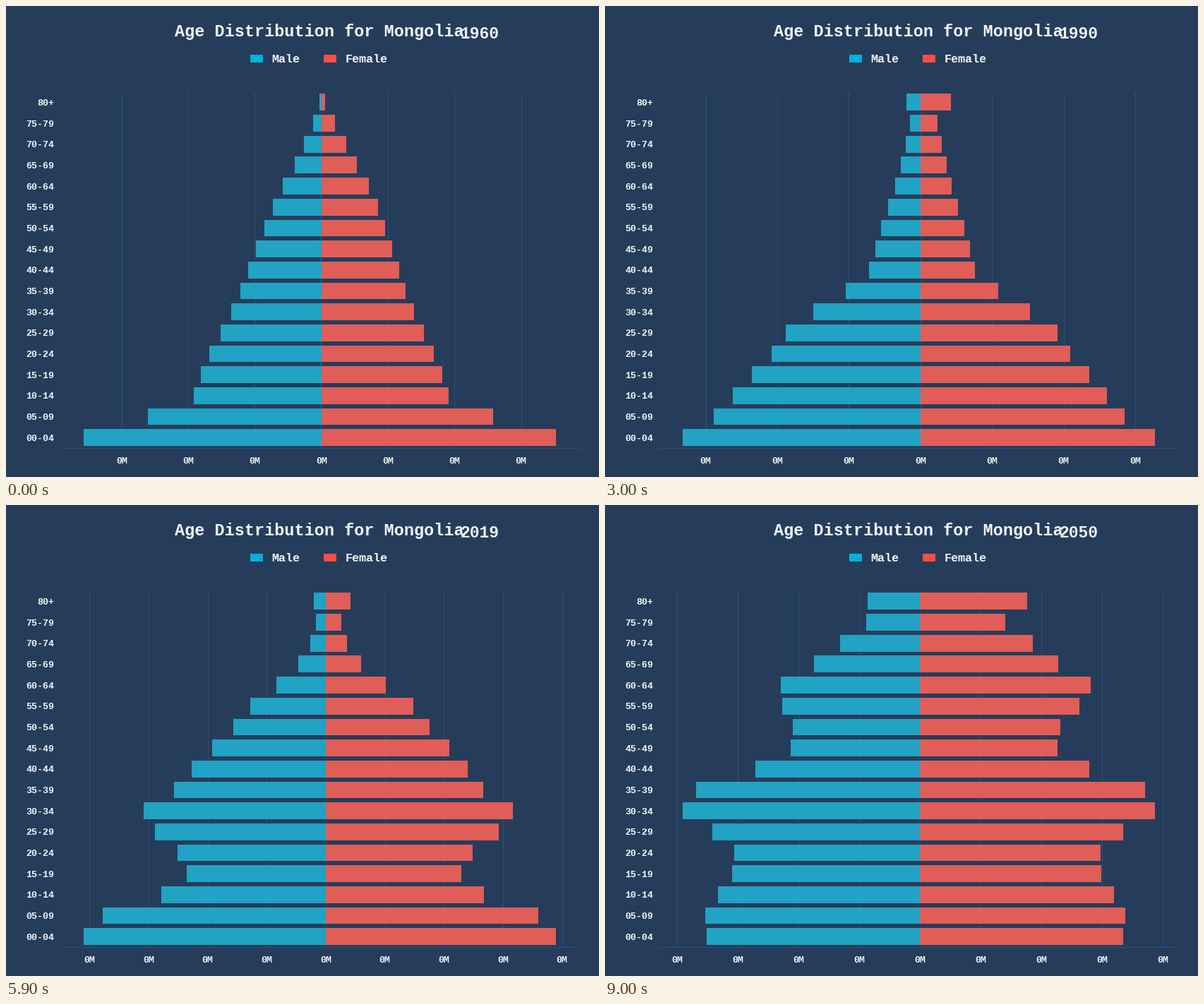
A matplotlib script that plays this animation: 840x667 px, repeating every 9.1 s.

```python
import numpy as np
import matplotlib.pyplot as plt
from matplotlib.animation import FuncAnimation
from matplotlib.patches import Rectangle
from matplotlib.ticker import FuncFormatter, MaxNLocator

W, H, DPI = 840, 667, 100
BG, GRID, INK = "#253d5b", "#2f507a", "#f2f4f6"
MALE, FEMALE = "#21a3c3", "#e15d57"
FIRST, LAST = 1960, 2050

# Turning points of the birth curve: year, boys born in five years (thousands).
BIRTHS = np.array([
    (1875, 0), (1885, 15), (1900, 27), (1925, 35), (1940, 44), (1949, 47),
    (1957, 82), (1961, 100), (1967, 108), (1976, 130), (1982, 143),
    (1987, 168), (1992, 150), (1997, 127), (2002, 119), (2007, 143),
    (2012, 195), (2017, 206), (2022, 178), (2027, 156), (2032, 156),
    (2042, 178), (2048, 176)]).T
AGES = np.arange(20) * 5 + 2.5
LABELS = [f"{a:02d}-{a + 4:02d}" for a in range(0, 80, 5)] + ["80+"]


def population(year):
    """Men and women by age group: births thinned by Gompertz mortality."""
    born = year - AGES
    boys = np.interp(born, *BIRTHS) * 1000
    girls = boys * np.interp(born, [1990, 2010], [.985, .95])
    hazard = np.interp(born, [1900, 1945, 1975, 2020], [.028, .036, .02, .009])
    aging = np.exp(.05 * AGES) - 1
    growth = np.interp(year, [1960, 1977], [.85, 1])
    for births, rate in ((boys, hazard), (girls, hazard - .01)):
        alive = growth * births * np.exp(-rate * aging)
        yield np.append(alive[:16], alive[16:].sum())


def px(size):
    return size * 72 / DPI


plt.rcParams.update({"font.family": "Liberation Mono", "font.weight": "bold"})
fig = plt.figure(figsize=(W / DPI, H / DPI), dpi=DPI, facecolor=BG)


def label(x, y, text, size, **kw):
    return fig.text(x / W, 1 - y / H, text, fontsize=px(size), color=INK,
                    va="baseline", **kw)


label(239, 43.5, "Age Distribution for Mongolia", 23.5)
year_text = label(671.3, 45.5, "", 23, ha="center")
for x, name, color in ((346, "Male", "#00b1de"), (450, "Female", "#ff4d44")):
    fig.add_artist(Rectangle((x / W, 1 - 80 / H), 18 / W, 11 / H, color=color, lw=0))
    label(x + 30.5, 80, name, 16.7)

ax = fig.add_axes([77 / W, 1 - 626 / H, 735 / W, 504.5 / H], facecolor="none")
ax.set_ylim(-.5, 16.5)
ax.set_yticks(range(17), LABELS)
ax.xaxis.set_major_locator(MaxNLocator(9, steps=[1, 2, 2.5, 5, 10]))
ax.xaxis.set_major_formatter(FuncFormatter(lambda v, _: f"{abs(v) / 1e6:.0f}M"))
ax.tick_params(length=0, labelcolor=INK, labelsize=px(13.3))
ax.tick_params(axis="x", pad=px(12.5))
ax.tick_params(axis="y", pad=px(8.5))
ax.grid(axis="x", color=GRID, lw=px(1))
ax.set_axisbelow(True)
for side in ("left", "right", "top"):
    ax.spines[side].set_visible(False)
ax.spines["bottom"].set(color=GRID, linewidth=px(1))

rows = np.arange(17)
men_bars = ax.barh(rows, np.zeros(17), .8, color=MALE)
women_bars = ax.barh(rows, np.zeros(17), .8, color=FEMALE)


def update(frame):
    year = FIRST + frame
    men, women = population(year)
    for bars, widths in ((men_bars, -men), (women_bars, women)):
        for bar, width in zip(bars, widths):
            bar.set_width(width)
    margin = .05 * (men.max() + women.max())
    ax.set_xlim(-men.max() - margin, women.max() + margin)
    year_text.set_text(str(year))


anim = FuncAnimation(fig, update, frames=LAST - FIRST + 1, interval=100,
                     init_func=lambda: update(0), repeat=True, repeat_delay=0)
plt.show()
```
